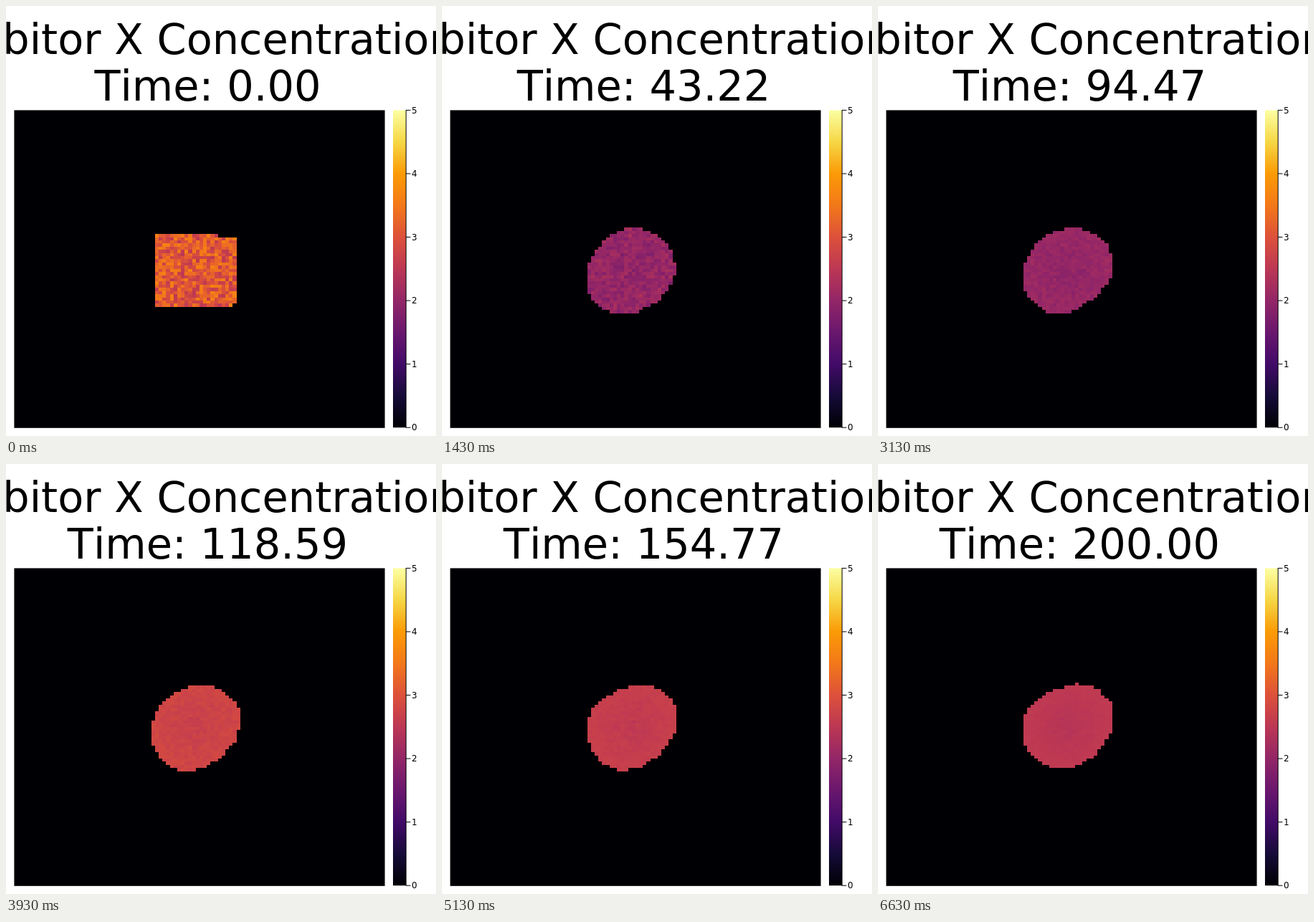
An HTML page with a canvas that plays this animation: 600 px wide and 600 px high, repeating every 6.66 s.

```html
<!DOCTYPE html>
<html lang="en">
<head>
<meta charset="utf-8">
<title>Inhibitor X Concentration</title>
<style>
  html, body { margin: 0; width: 100%; height: 100%; overflow: hidden; background: #fff; }
  canvas { display: block; }
</style>
</head>
<body>
<canvas id="stage" width="600" height="600"></canvas>
<script>
const ctx = document.getElementById('stage').getContext('2d');
const LOOP = 6660, LAST = 199, CELLS = 500;
const FONT = '"DejaVu Sans", sans-serif';

const inferno = ['#000004', '#160b39', '#420a68', '#6a176e', '#932667', '#bc3754',
  '#dd513a', '#f37819', '#fb9b06', '#f6d746', '#fcffa4'];
const stops = inferno.map(c => [1, 3, 5].map(i => parseInt(c.slice(i, i + 2), 16)));

// Mean concentration: step and level
const levels = [[0, 3.08], [20, 1.95], [65, 2.13], [94, 2.07], [118, 2.79], [154, 2.66], [199, 2.55]];

const mix = (a, b, f) => a + (b - a) * f;
const cellX = col => 11.4 + col * 5.17;
const cellY = row => 145.5 + row * 4.425;

function random(a, b, c) {
  const n = Math.sin(a * 127.1 + b * 311.7 + c * 74.7) * 43758.5453;
  return n - Math.floor(n);
}

// Noise from -1 to 1 that drifts to new values every `span` steps
function drift(col, row, step, span, seed) {
  const n = Math.floor(step / span);
  return 2 * mix(random(col, row, n + seed), random(col, row, n + 1 + seed), step / span - n) - 1;
}

function levelAt(step) {
  const i = Math.max(1, levels.findIndex(([at]) => at >= step));
  const [a, from] = levels[i - 1], [b, to] = levels[i];
  return mix(from, to, (step - a) / (b - a));
}

function colorOf(value) {
  const u = Math.min(9.999, Math.max(0, value * 2)), i = Math.floor(u);
  return `rgb(${stops[i].map((c, j) => Math.round(mix(c, stops[i + 1][j], u - i)))})`;
}

// Distance from the middle of the starting block, with ties broken towards the lower left
function blockSize(col, row) {
  const tie = (col - .18 * row) * 1e-5;
  return 115 * (Math.max(Math.abs(col - 48.5) / 22, Math.abs(row - 50) / 23) + tie);
}

// Distance outside a tilted, slowly stretching and wobbling oval
function ovalDepth(dx, dy, progress) {
  const angle = Math.atan2(dy, dx);
  const stretch = mix(4, 6.2, progress) * Math.cos(2 * (angle - mix(-.72, -.54, progress)));
  const wobble = 1.2 * Math.sin(3 * angle + 4 * progress);
  return Math.hypot(dx, dy) - stretch - wobble;
}

// The innermost cells win, so the area stays constant
function drawBlob(step) {
  const progress = step / LAST, rounding = Math.min(1, step / 12);
  const level = levelAt(step), spread = .58 * Math.exp(-step / 65);
  const dip = .12 * Math.min(1, step / 100);
  const centerX = mix(262.5, 265, progress), centerY = mix(371.5, 365.5, progress);
  const cells = [];
  for (let row = 30; row < 70; row++) {
    for (let col = 30; col < 70; col++) {
      const dx = cellX(col + .5) - centerX, dy = cellY(row + .5) - centerY;
      const oval = ovalDepth(dx, dy, progress) + drift(col, row, step, 3, 500);
      const depth = mix(blockSize(col, row), oval, rounding);
      cells.push({ col, row, depth, core: Math.max(0, 1 - Math.hypot(dx, dy) / 58) });
    }
  }
  cells.sort((a, b) => a.depth - b.depth);
  for (const { col, row, core } of cells.slice(0, CELLS)) {
    const patch = core * (1 + .6 * drift(col >> 1, row, step, 12, 900));
    const x = Math.round(cellX(col)), y = Math.round(cellY(row));
    ctx.fillStyle = colorOf(level + spread * drift(col, row, step, 8, 0) - dip * patch);
    ctx.fillRect(x, y, Math.round(cellX(col + 1)) - x, Math.round(cellY(row + 1)) - y);
  }
}

const ramp = ctx.createLinearGradient(0, 588, 0, 145);
inferno.forEach((c, i) => ramp.addColorStop(i / 10, c));

function drawColorbar() {
  ctx.fillStyle = ramp;
  ctx.fillRect(540, 145.4, 18, 442.8);
  ctx.fillStyle = '#000';
  ctx.fillRect(557.7, 145, 1, 443.6);
  ctx.font = `12px ${FONT}`;
  ctx.textAlign = 'left';
  for (let n = 0; n <= 5; n++) {
    const y = 588.2 - n * 88.56;
    ctx.fillRect(558, y - .5, 6.5, 1);
    ctx.fillText(n, 566, y + 4.2);
  }
}

function drawTitle(step) {
  ctx.fillStyle = '#000';
  ctx.font = `59px ${FONT}`;
  ctx.fontKerning = 'none';
  ctx.textAlign = 'left';
  ctx.fillText('Inhibitor X Concentration', -113.4, 67);
  ctx.textAlign = 'center';
  ctx.fillText(`Time: ${(step * 200 / LAST).toFixed(2)}`, 281.5, 132);
}

// Three steps per 100 ms, lasting 30, 40 and 30 ms
function stepAt(time) {
  const rest = time % 100;
  return Math.floor(time / 100) * 3 + (rest < 30 ? 0 : rest < 70 ? 1 : 2);
}

const start = performance.now();
let shown = -1;
function frame() {
  const step = stepAt((performance.now() - start) % LOOP);
  if (step !== shown) {
    shown = step;
    ctx.fillStyle = '#fff';
    ctx.fillRect(0, 0, 600, 600);
    drawTitle(step);
    ctx.fillStyle = '#000004';
    ctx.fillRect(11.4, 145.4, 517.2, 443.4);
    drawBlob(step);
    drawColorbar();
  }
  requestAnimationFrame(frame);
}
frame();
</script>
</body>
</html>
```
